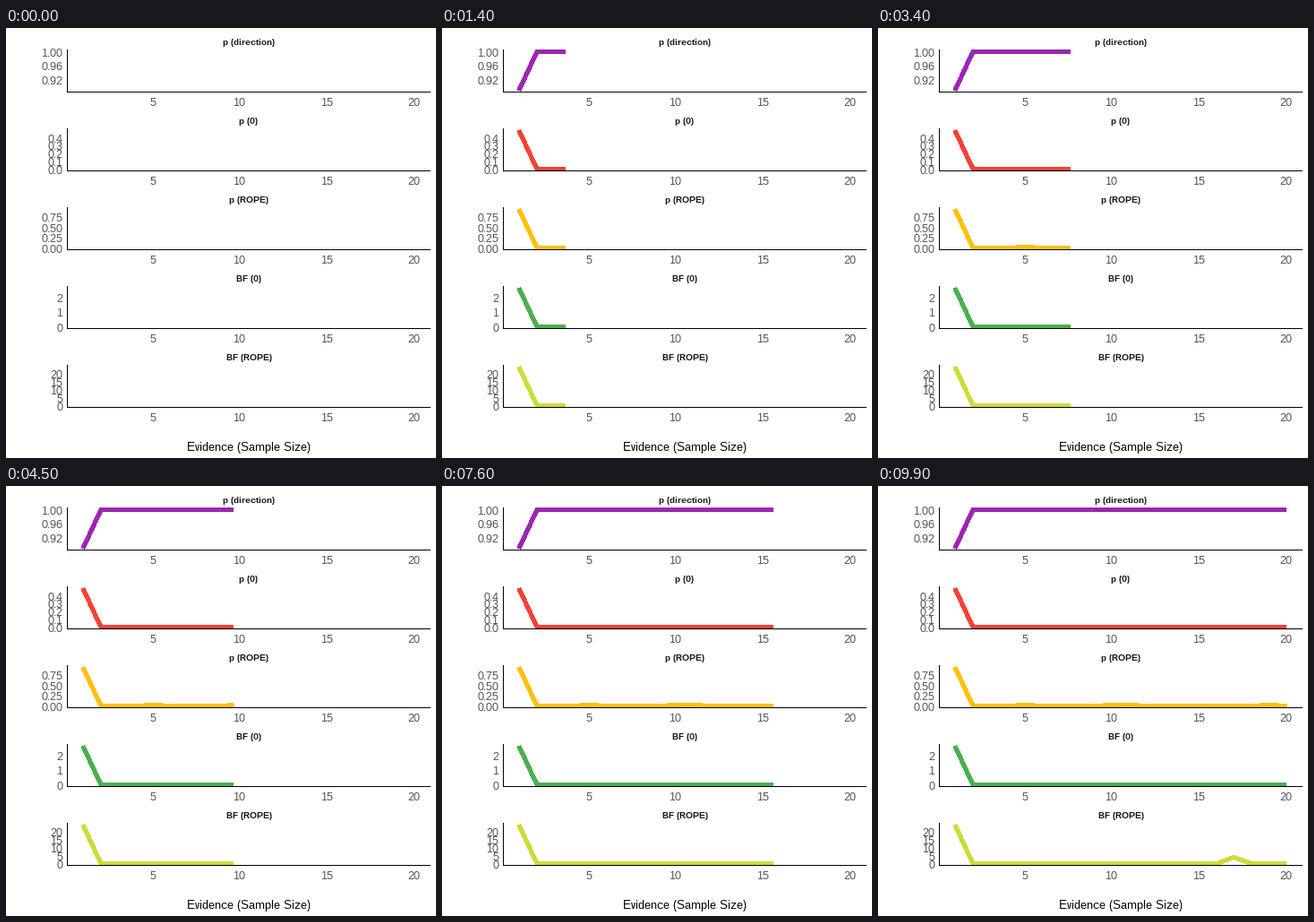
A matplotlib script that plays this animation: 480 by 480 pixels, repeating every 10000 ms.

```python
import numpy as np
import matplotlib.pyplot as plt
from matplotlib.animation import FuncAnimation
from matplotlib.patches import Rectangle

FRAMES, SIZE, DPI = 100, 480, 96
PX = 72 / DPI                     # one pixel in points
LEFT, RIGHT = 68, 474
TOP, BASE, PITCH = 24, 71, 88     # panel top, axis row, panel spacing
Y_MAX, Y_MIN = 26, 69             # rows of the largest and smallest value

# whole-pixel glyph advances give crisp small text
plt.rcParams.update({"font.family": "Liberation Sans",
                     "text.hinting": "default", "text.hinting_factor": 1})

n = np.arange(1, 21)
key_frames = np.round(np.linspace(0, FRAMES - 1, n.size))


def series(first, rest=0.0, bumps=None):
    v = np.full(n.size, float(rest))
    v[0] = first
    for k, b in (bumps or {}).items():
        v[k - 1] = b
    return v


# title, colour, values, ticks, tick format
PANELS = [
    ("p (direction)", "#9C27B0", series(0.8885, 1), (0.92, 0.96, 1), "%.2f"),
    ("p (0)", "#F44336", series(0.485), (0, 0.1, 0.2, 0.3, 0.4), "%.1f"),
    ("p (ROPE)", "#FFC107", series(0.92, 0, {5: 0.025, 10: 0.025, 11: 0.025, 19: 0.025}),
     (0, 0.25, 0.5, 0.75), "%.2f"),
    ("BF (0)", "#4CAF50", series(2.6), (0, 1, 2), "%d"),
    ("BF (ROPE)", "#CDDC39", series(24, 0, {17: 3.7}), (0, 5, 10, 15, 20), "%d"),
]

fig = plt.figure(figsize=(SIZE / DPI, SIZE / DPI), dpi=DPI, facecolor="white")
ax = fig.add_axes([0, 0, 1, 1])
ax.set_xlim(0, SIZE)
ax.set_ylim(SIZE, 0)
ax.axis("off")


def x_px(v):
    return 66.8 + 19.45 * v


def y_px(v, values, top):
    lo, hi = values.min(), values.max()
    return top + Y_MIN - (v - lo) / (hi - lo) * (Y_MIN - Y_MAX)


def label(x, y, text, size, color, ha="center", **kw):
    ax.text(x, y, text, fontsize=size * PX, color=color, ha=ha, va="baseline", zorder=4, **kw)


def bar(x, y, w, h):
    ax.add_patch(Rectangle((x, y), w, h, fc="black", lw=0, aa=False, zorder=3))


curves = []
for i, (title, color, values, ticks, fmt) in enumerate(PANELS):
    top = i * PITCH
    bar(LEFT, top + BASE, RIGHT - LEFT, 1)
    bar(LEFT, top + TOP, 1, BASE + 1 - TOP)
    label(271, top + 19, title, 10, "#1A1A1A", weight="bold")
    for t in ticks:
        label(63.5, round(y_px(t, values, top) + 6), fmt % t, 12, "#4D4D4D", "right")
    for t in (5, 10, 15, 20):
        label(x_px(t), top + 87, str(t), 12, "#4D4D4D")

    # without antialiasing every touched pixel is filled, so 4 px shows as 5
    line, = ax.plot([], [], color=color, lw=4 * PX, aa=False, snap=False, zorder=2,
                    solid_capstyle="butt", solid_joinstyle="round")
    line.set_clip_path(Rectangle((LEFT, top + TOP), RIGHT - LEFT, BASE - TOP,
                                 transform=ax.transData))
    curves.append((line, values, top))

label(271, 472, "Evidence (Sample Size)", 13, "black")


def update(frame):
    tip = np.interp(frame, key_frames, n)
    xs = np.append(n[n < tip], tip) if frame else np.array([])
    for line, values, top in curves:
        ys = y_px(np.interp(xs, n, values), values, top)
        line.set_data(np.round(x_px(xs)), np.round(ys) + 0.5)
    return [c[0] for c in curves]


anim = FuncAnimation(fig, update, frames=FRAMES, interval=100, repeat=True, repeat_delay=0)
plt.show()
```
